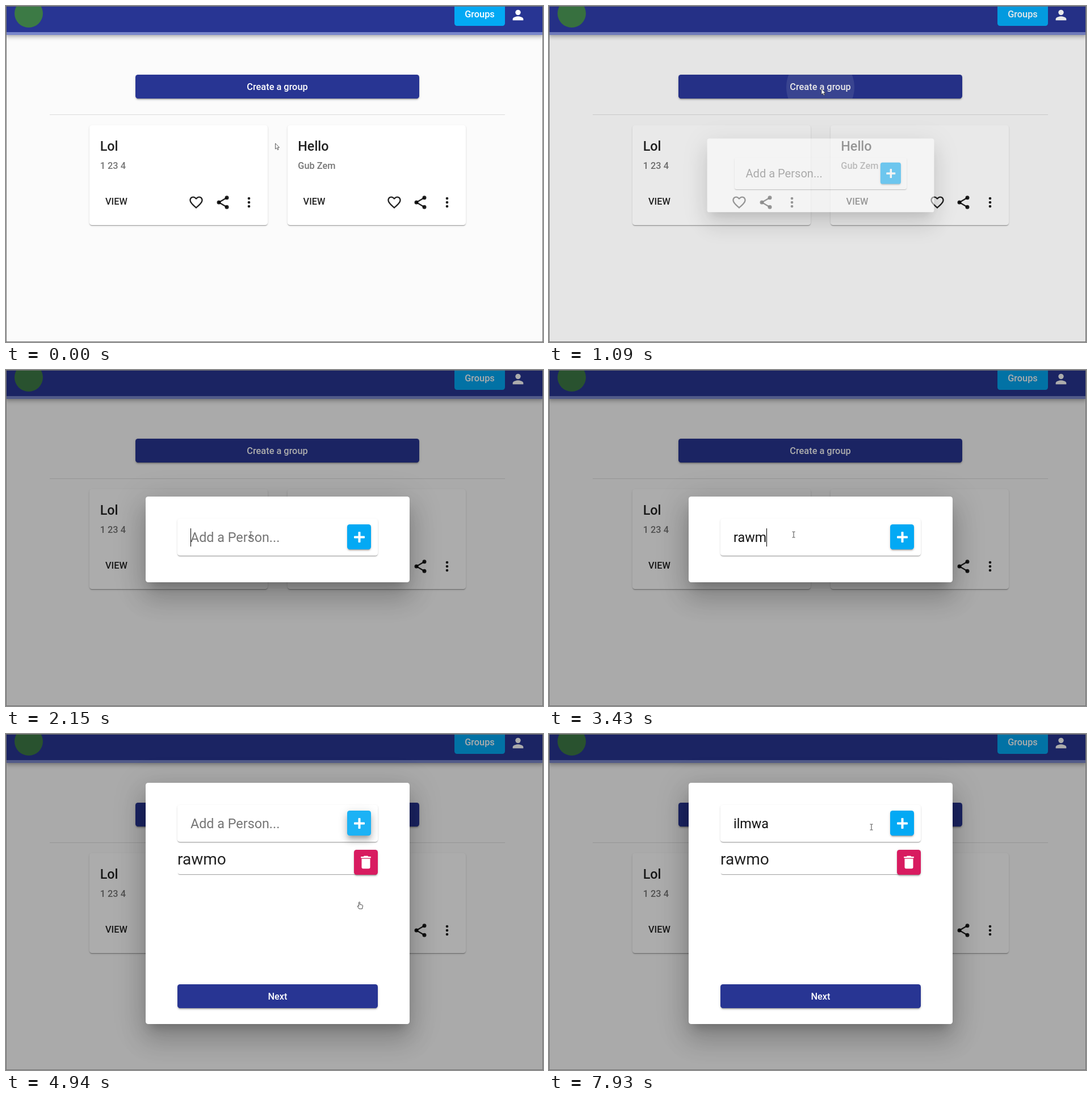
Write an HTML page that moves like this. It is 946 px wide and 592 px high and loops after 8000 ms.

```html
<!DOCTYPE html>
<html lang="en">
<head>
<meta charset="utf-8">
<title>Create a group</title>
<style>
html, body { margin: 0; width: 100%; height: 100%; overflow: hidden; }
body { position: relative; background: #fbfbfb; font: 500 16.33px/0 Roboto, sans-serif; color: rgba(0,0,0,.87); cursor: none; }
body *, body svg { position: absolute; box-sizing: border-box; }
svg * { position: static; }
.text { white-space: pre; }
.btn { border-radius: 4.5px; color: #fff; background: #283593; display: flex; align-items: center; justify-content: center; overflow: hidden;
  box-shadow: 0 3.5px 1.2px -2.3px rgba(0,0,0,.2), 0 2.3px 2.3px rgba(0,0,0,.14), 0 1.2px 5.8px rgba(0,0,0,.12); }
.btn span { position: relative; }
.wide span { top: .5px; }
.z1 { border-radius: 4.5px; box-shadow: 0 2.3px 1.2px -1.2px rgba(0,0,0,.2), 0 1.2px 1.2px rgba(0,0,0,.14), 0 1.2px 3.5px rgba(0,0,0,.12); }
.ripple { border-radius: 50%; background: rgba(255,255,255,.1); }
.icon { width: 28px; height: 28px; fill: currentColor; }

#bar { left: 0; top: 0; width: 946px; height: 51px; background: #283593; border-bottom: 5px solid #7986cb;
  box-shadow: 0 2.3px 4.7px -1.2px rgba(0,0,0,.2), 0 4.7px 5.8px rgba(0,0,0,.14), 0 1.2px 11.7px rgba(0,0,0,.12); }
#logo { left: 15px; top: -12px; width: 50px; height: 50px; border-radius: 50%; background: #3c7a45; }
#groups { left: 790px; top: -6px; width: 89px; height: 41px; background: #03a9f4; box-shadow: none; }
#create { left: 228px; top: 121px; width: 500px; height: 42px; }
#rule { left: 77px; top: 191px; width: 802px; height: 1px; background: #dcdcdc; }
.card { top: 210px; width: 314px; height: 176px; background: #fff; }
.title { left: 18.7px; top: 37px; font-size: 23.33px; }
.sub { left: 18.7px; top: 71.5px; color: rgba(0,0,0,.54); }
.view { left: 28px; top: 134.5px; }
#shade { inset: 0; background: #000; }

#dialog { left: 246px; width: 465px; background: #fff; border-radius: 4.5px;
  box-shadow: 0 13px 17.5px -8px rgba(0,0,0,.2), 0 28px 44px 3.5px rgba(0,0,0,.14), 0 10.5px 54px 9px rgba(0,0,0,.12); }
#field { left: 56px; top: 39px; width: 353px; height: 65px; }
#entry { left: 79px; top: 71.5px; font-size: 23.33px; font-weight: 400; }
#value { position: relative; }
#caret { left: 100%; top: -16px; width: 1px; height: 32px; background: #000; }
#add { left: 355px; top: 49px; width: 42px; height: 44px; background: #03a9f4; }
#add.hot { background: #1cb2f5; box-shadow: 0 6px 6px -3px rgba(0,0,0,.2), 0 9px 12px 1px rgba(0,0,0,.14), 0 3.5px 16px 2px rgba(0,0,0,.12); }
#spot { left: 6px; top: 15px; width: 30px; height: 30px; }
#item { left: 56px; top: 112px; width: 353px; height: 49px; border-radius: 4.5px; box-shadow: 0 2.3px 1.2px -1.2px rgba(0,0,0,.4); }
#item .text { left: 0; top: 23px; font-size: 28px; font-weight: 400; }
#del { left: 311px; top: 6px; width: 42px; height: 44px; background: #d81b60; }
#next { left: 56px; top: 355px; width: 353px; height: 42px; }
#cursor { left: 0; top: 0; width: 20px; height: 20px; overflow: visible; }
#frame { inset: 0; border: 1px solid #757575; }
</style>
</head>
<body>
<svg width="0" height="0">
  <symbol id="heart" viewBox="0 0 24 24"><path d="M16.5 3c-1.74 0-3.41.81-4.5 2.09C10.91 3.81 9.24 3 7.5 3 4.42 3 2 5.42 2 8.5c0 3.78 3.4 6.86 8.55 11.54L12 21.35l1.45-1.32C18.6 15.36 22 12.28 22 8.5 22 5.42 19.58 3 16.5 3zm-4.4 15.55l-.1.1-.1-.1C7.14 14.24 4 11.39 4 8.5 4 6.5 5.5 5 7.5 5c1.54 0 3.04.99 3.57 2.36h1.87C13.46 5.99 14.96 5 16.5 5c2 0 3.5 1.5 3.5 3.5 0 2.89-3.14 5.74-7.9 10.05z"/></symbol>
  <symbol id="share" viewBox="0 0 24 24"><path d="M18 5L6 12l12 7" fill="none" stroke="currentColor" stroke-width="2"/><circle cx="18" cy="5" r="3"/><circle cx="6" cy="12" r="3"/><circle cx="18" cy="19" r="3"/></symbol>
  <symbol id="more" viewBox="0 0 24 24"><circle cx="12" cy="6" r="2"/><circle cx="12" cy="12" r="2"/><circle cx="12" cy="18" r="2"/></symbol>
</svg>

<div id="bar">
  <div id="logo"></div>
  <div id="groups" class="btn"><span>Groups</span></div>
  <svg class="icon" style="left:888.3px;top:1.5px;color:#fff" viewBox="0 0 24 24"><circle cx="12" cy="8" r="4"/><path d="M12 14c-2.67 0-8 1.34-8 4v2h16v-2c0-2.66-5.33-4-8-4z"/></svg>
</div>
<div id="create" class="btn wide"><div id="ripple" class="ripple"></div><span>Create a group</span></div>
<div id="rule"></div>
<div id="cards" style="left:0;top:0"></div>
<div id="shade"></div>

<div id="dialog">
  <div id="field" class="z1"></div>
  <div id="entry" class="text"><span id="value"></span><div id="caret"></div></div>
  <div id="add" class="btn"><div id="spot" class="ripple"></div>
    <svg style="left:11.5px;top:13px" width="19" height="19" fill="#fff"><rect x="0" y="7.5" width="19" height="4" rx="1"/><rect x="7.5" y="0" width="4" height="19" rx="1"/></svg></div>
  <div id="list">
    <div id="item"><div class="text">rawmo</div>
      <div id="del" class="btn"><svg width="30" height="30" viewBox="0 0 24 24" fill="#fff"><path d="M6 19c0 1.1.9 2 2 2h8c1.1 0 2-.9 2-2V7H6v12zM19 4h-3.5l-1-1h-5l-1 1H5v2h14V4z"/></svg></div></div>
    <div id="next" class="btn wide"><span>Next</span></div>
  </div>
</div>

<svg id="cursor"><path id="pointer" stroke-linejoin="round"/></svg>
<div id="frame"></div>

<script>
const LOOP = 8000, OPEN = 1057, ADDED = 4820;
const $ = id => document.getElementById(id);

const icon = (name, x) => `<svg class="icon" style="left:${x - 14}px;top:122px"><use href="#${name}"/></svg>`;
const card = (x, title, people) => `<div class="card z1" style="left:${x}px">
  <div class="text title">${title}</div><div class="text sub">${people}</div><div class="text view">VIEW</div>
  ${icon('heart', 188.2)}${icon('share', 234.8)}${icon('more', 281.3)}</div>`;
$('cards').innerHTML = card(147, 'Lol', '1 23 4') + card(495.6, 'Hello', 'Gub Zem');

// Pointer shapes: path, fill, stroke, stroke width
const shapes = {
  arrow: ['M0 0V10L2.3 7.9 4 11.5 5.6 10.8 4 7.3H7Z', '#fff', '#333', .8],
  beam: ['M-2.5 -5H-.7L0 -4.5 .7 -5H2.5M0 -4.5V4.5M-2.5 5H-.7L0 4.5 .7 5H2.5', 'none', '#444', 1],
  hand: ['M-2.5 1V-5.5Q-1.5 -7 -.5 -5.5V-1.5L3.5 -.8Q4.7 -.4 4.5 1L3.5 6H-2L-5 1.5Q-4.5 0 -2.5 1.5Z', '#fff', '#333', .9]
};

const moves = [
  [0, 474.5, 242, 'arrow'], [270, 467, 174, 'arrow'], [440, 473, 152, 'arrow'], [565, 479, 137, 'arrow'],
  [690, 480, 146, 'arrow'], [1210, 461, 158, 'arrow'], [1580, 444, 220, 'arrow'], [1705, 434, 272, 'beam'],
  [1830, 431, 290, 'beam'], [4120, 479, 285, 'beam'], [4260, 535, 294, 'beam'], [4390, 592, 300, 'beam'],
  [4520, 624, 302, 'hand'], [5260, 594, 266, 'arrow'], [5390, 515, 208, 'arrow'], [5520, 479, 182, 'arrow'],
  [5930, 461, 174, 'beam'], [7800, 508, 170, 'beam'], [7930, 568, 164, 'beam']
];
const typed = [
  [0, ''], [3040, 'r'], [3160, 'ra'], [3430, 'rawm'], [3690, 'rawmo'], [ADDED, ''],
  [6520, 'il'], [6660, 'ilm'], [6820, 'ilmw'], [7370, 'ilmwa']
];
const caret = [[0, 0], [2150, 1], [2730, 0], [3040, 1], [4260, 0], [6230, 1], [7930, 0]];
const redraws = [[0], [1090], [1210], [1580]];

const at = (track, t) => track.findLast(k => k[0] <= t);
const show = (id, on) => $(id).style.visibility = on ? 'visible' : 'hidden';

// CSS-style cubic-bezier easing
function bezier(x1, y1, x2, y2) {
  const f = (a, b, s) => 3 * a * s * (1 - s) ** 2 + 3 * b * s * s * (1 - s) + s ** 3;
  return x => {
    if (x <= 0 || x >= 1) return x <= 0 ? 0 : 1;
    let lo = 0, hi = 1;
    for (let i = 0; i < 24; i++) {
      const mid = (lo + hi) / 2;
      if (f(x1, x2, mid) < x) lo = mid; else hi = mid;
    }
    return f(y1, y2, lo);
  };
}
const popEase = bezier(0, 0, .2, 1), shadeEase = bezier(.25, .8, .25, 1);

function draw(t) {
  const [drawn] = at(redraws, t);

  const r = 60 + (drawn - 1090) * 1.017;
  show('ripple', drawn === 1090 || drawn === 1210);
  Object.assign($('ripple').style, { left: 250 - r + 'px', top: 22 - r + 'px', width: 2 * r + 'px', height: 2 * r + 'px' });

  const p = popEase((drawn - OPEN) / 150), full = t >= ADDED;
  $('shade').style.opacity = .325 * shadeEase((drawn - OPEN) / 400);
  Object.assign($('dialog').style, {
    opacity: p, transform: p < 1 ? `scale(${.7 + .3 * p})` : 'none',
    top: full ? '86px' : '223px', height: full ? '425px' : '150.5px'
  });
  $('list').style.display = full ? 'block' : 'none';

  const text = at(typed, t)[1];
  $('value').textContent = text || 'Add a Person...';
  $('entry').style.color = text ? '#111' : '#757575';
  $('caret').style.left = text ? '100%' : '0';
  show('caret', at(caret, t)[1]);

  $('add').classList.toggle('hot', full && t < 5260);
  show('spot', t >= 4680 && t < ADDED);

  const [, x, y, kind] = at(moves, t), [d, fill, stroke, width] = shapes[kind];
  $('cursor').style.transform = `translate(${x}px,${y}px)`;
  const attrs = { d, fill, stroke, 'stroke-width': width };
  for (const k in attrs) $('pointer').setAttribute(k, attrs[k]);
}

function tick() {
  draw(performance.now() % LOOP);
  requestAnimationFrame(tick);
}
tick();
</script>
</body>
</html>
```
